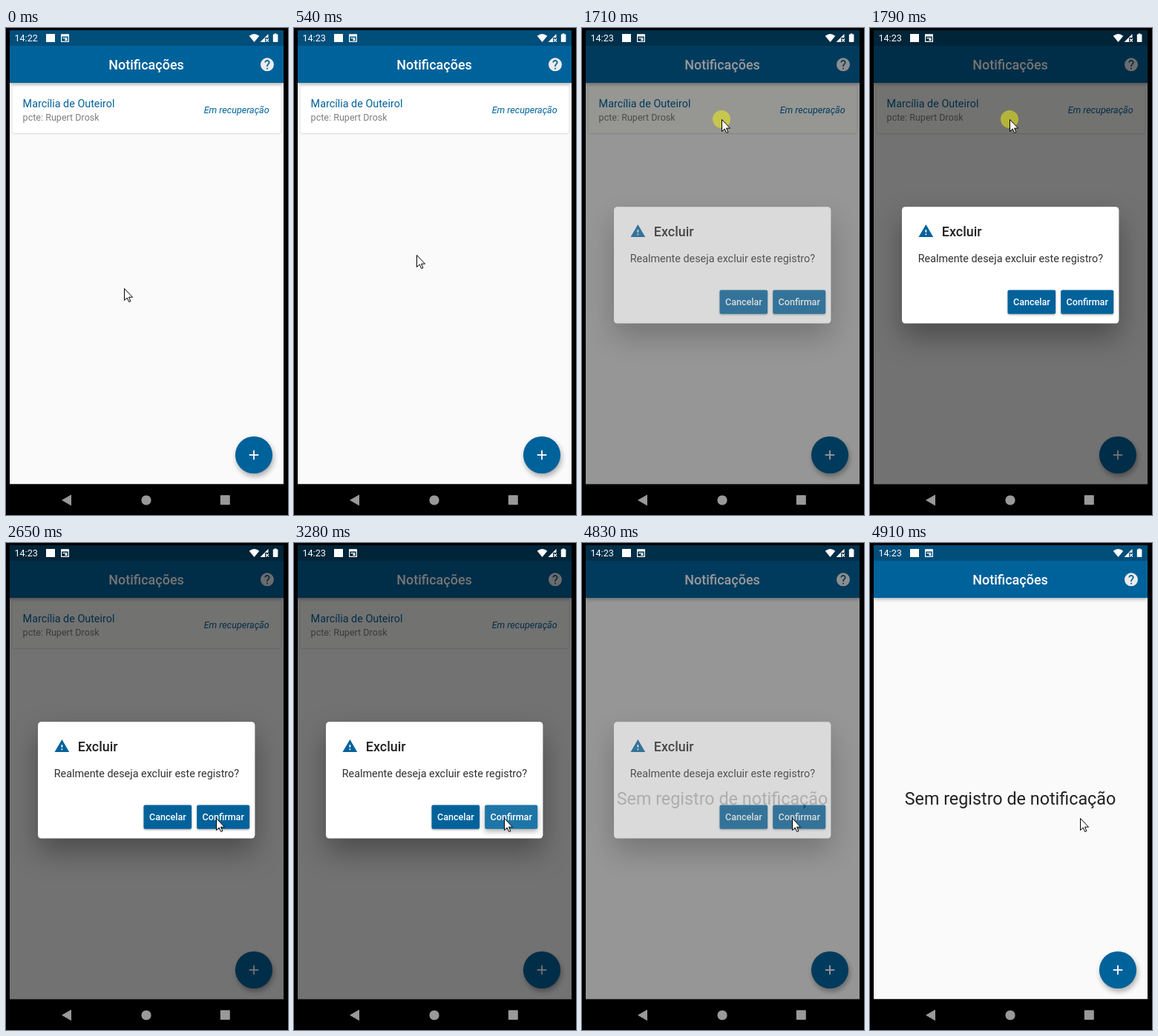
Recreate the animation shown at these times as an HTML page with a canvas. Size 380 by 657 pixels, loop 6.03 s.

```html
<!DOCTYPE html>
<html lang="pt">
<head>
<meta charset="utf-8">
<title>Notificações</title>
<style>
  html, body { margin: 0; width: 100%; height: 100%; overflow: hidden; background: #000; }
  canvas { display: block; width: 380px; height: 657px; }
</style>
</head>
<body>
<canvas id="stage" width="380" height="657"></canvas>
<script>
const LOOP = 6030, DP = 0.898;
const BLUE = '#00629b', INK = '#212121', BODY = '#fafafa';
const SCREEN = [5, 3, 369, 612.5];
const stage = document.getElementById('stage').getContext('2d');
const dialogLayer = document.createElement('canvas');
dialogLayer.width = 380;
dialogLayer.height = 657;
const layer = dialogLayer.getContext('2d');

const HELP = new Path2D('M12 2a10 10 0 1 0 0 20a10 10 0 1 0 0-20zm1 17h-2v-2h2v2zm2.07-7.75l-.9.92C13.45 12.9 13 13.5 13 15h-2v-.5c0-1.1.45-2.1 1.17-2.83l1.24-1.26c.37-.36.59-.86.59-1.41 0-1.1-.9-2-2-2s-2 .9-2 2H8c0-2.21 1.79-4 4-4s4 1.79 4 4c0 .88-.36 1.68-.93 2.25z');
const WARNING = new Path2D('M1 21h22L12 2zm12-3h-2v-2h2v2zm0-4h-2v-4h2v4z');
const ARROW = new Path2D('M.5.5V16.5L4.2 13L6.7 18.5L8.9 17.6L6.5 12.2H11.5z');

// Stepped progress: the first step shows at start, the last one at end.
function steps(t, start, end, count) {
  if (t < start) return 0;
  if (t >= end) return 1;
  return (Math.floor((t - start) / (end - start) * (count - 1) + 0.001) + 1) / count;
}
const smooth = p => p * p * (3 - 2 * p);
const mix = (a, b, p) => a + (b - a) * p;

function text(c, str, x, y, sp, color, style = '400', align = 'left') {
  c.font = `${style} ${sp * DP}px Roboto, sans-serif`;
  c.textAlign = align;
  c.fillStyle = color;
  c.fillText(str, x, y);
}

function rect(c, x, y, w, h, color) {
  c.fillStyle = color;
  c.fillRect(x, y, w, h);
}

function disc(c, x, y, r, color) {
  c.fillStyle = color;
  c.beginPath();
  c.arc(x, y, r, 0, 2 * Math.PI);
  c.fill();
}

function poly(c, points, color) {
  c.fillStyle = color;
  c.beginPath();
  points.forEach(([x, y]) => c.lineTo(x, y));
  c.fill();
}

function icon(c, path, x, y, color) {
  c.save();
  c.translate(x, y);
  c.scale(DP, DP);
  c.fillStyle = color;
  c.fill(path, 'evenodd');
  c.restore();
}

function withShadow(c, alpha, blur, dx, dy, draw) {
  c.save();
  c.shadowColor = `rgba(0,0,0,${alpha})`;
  c.shadowBlur = blur;
  c.shadowOffsetX = dx;
  c.shadowOffsetY = dy;
  draw();
  c.restore();
}

function roundRect(c, x, y, w, h, r, color) {
  c.fillStyle = color;
  c.beginPath();
  c.roundRect(x, y, w, h, r);
  c.fill();
}

function drawCard(c, ripple) {
  const box = [8.6, 77.6, 362, 64.4, 3.6];
  withShadow(c, 0.22, 2, 0, 0.6, () => roundRect(c, ...box, '#fff'));
  if (ripple > 0) {
    c.save();
    c.beginPath();
    c.roundRect(...box);
    c.clip();
    disc(c, 188, 123, mix(20, 200, ripple), 'rgba(150,150,50,0.05)');
    c.restore();
  }
  text(c, 'Marcília de Outeirol', 22.6, 107, 16, BLUE);
  text(c, 'pcte: Rupert Drosk', 22.6, 125, 14, '#7d7d7d');
  text(c, 'Em recuperação', 354.7, 115, 14, BLUE, 'italic 400', 'right');
}

function drawApp(c, t) {
  rect(c, ...SCREEN, BODY);
  if (t < 3520) drawCard(c, steps(t, 1250, 1550, 5));
  if (t >= 4830) text(c, 'Sem registro de notificação', 189, 353, 26, INK, '400', 'center');

  withShadow(c, 0.35, 5, 0, 1.5, () => rect(c, 5, 24, 369, 50, BLUE));
  rect(c, 5, 3, 369, 21, '#004e7a');
  text(c, 'Notificações', 189, 56, 20, '#fff', '500', 'center');
  icon(c, HELP, 341.2, 38.5, '#ececec');

  withShadow(c, 0.32, 7, 1.5, 4, () => disc(c, 334, 576, 25.1, BLUE));
  rect(c, 327.7, 575.1, 12.6, 1.8, '#fff');
  rect(c, 333.1, 569.7, 1.8, 12.6, '#fff');
}

function drawStatus(c, t) {
  text(c, t < 70 ? '14:22' : '14:23', 11.5, 18.3, 14, '#fff');
  rect(c, 54, 8, 12, 11, '#fff');

  c.strokeStyle = '#fff';
  c.lineWidth = 1.2;
  c.strokeRect(74.6, 9.1, 9.8, 9.3);
  rect(c, 74, 8.5, 11, 3, '#fff');
  rect(c, 76.5, 13, 6, 1.2, '#fff');
  rect(c, 79.5, 14.5, 3, 2.5, '#fff');

  c.fillStyle = '#fff';
  c.beginPath();
  c.moveTo(334.5, 19);
  c.lineTo(327.7, 10.7);
  c.quadraticCurveTo(334.5, 5.3, 341.3, 10.7);
  c.fill();

  poly(c, [[342.5, 19], [353.5, 8], [353.5, 13], [349, 13], [349, 19]], '#fff');
  c.beginPath();
  c.moveTo(350, 14.5);
  c.lineTo(354, 18.5);
  c.moveTo(354, 14.5);
  c.lineTo(350, 18.5);
  c.stroke();

  rect(c, 361.5, 7.5, 3, 2, '#fff');
  roundRect(c, 359.8, 8.5, 6.6, 10.5, 0.8, '#fff');
}

function drawNavigation(c) {
  const grey = '#999';
  poly(c, [[75, 637], [88, 629.5], [88, 644.5]], grey);
  disc(c, 189, 637, 6.6, grey);
  roundRect(c, 288.8, 630.3, 13, 13, 1, grey);
}

function drawButton(c, label, x, w, press) {
  withShadow(c, 0.32, mix(3, 9, press), 0, mix(1.2, 4, press), () =>
    roundRect(c, x, 353.5, w, 32.2, 2, BLUE));
  if (press > 0) roundRect(c, x, 353.5, w, 32.2, 2, `rgba(255,255,255,${0.15 * press})`);
  text(c, label, x + w / 2, 374.3, 14, '#fff', '500', 'center');
}

function drawDialog(c, press) {
  c.clearRect(0, 0, 380, 657);
  withShadow(c, 0.34, 38, 0, 18, () => roundRect(c, 43, 241.3, 292.4, 157.2, 4.5, '#fff'));
  icon(c, WARNING, 64.6, 263.2, BLUE);
  text(c, 'Excluir', 96.8, 280.5, 20, INK, '500');
  text(c, 'Realmente deseja excluir este registro?', 64.7, 316, 16, '#303030');
  drawButton(c, 'Cancelar', 185.5, 64.6, 0);
  drawButton(c, 'Confirmar', 257.2, 71, press);
}

function dialogOpacity(t) {
  if (t < 1710 || t >= 4910) return [0, 0];
  if (t < 1790) return [0.4, 0.65];
  return t < 4830 ? [0.54, 1] : [0.4, 0.65];
}

function cursorAt(t) {
  const up = smooth(steps(t, 390, 860, 7));
  const down = smooth(steps(t, 1950, 2500, 8));
  const settle = steps(t, 2580, 2650, 2);
  return [
    159 + 29 * up + 94 * down + settle,
    351 - 228 * up + 235 * down + 13 * settle
  ];
}

function drawCursor(c, t) {
  if (t >= 1010 && t < 1950) disc(c, 188, 123, 12, 'rgba(255,255,0,0.47)');
  c.save();
  c.translate(...cursorAt(t).map(Math.round));
  c.fillStyle = '#fff';
  c.strokeStyle = '#000';
  c.lineWidth = 1;
  c.lineJoin = 'round';
  c.fill(ARROW);
  c.stroke(ARROW);
  c.restore();
}

function render(t) {
  rect(stage, 0, 0, 380, 657, '#000');
  stage.save();
  stage.beginPath();
  stage.rect(...SCREEN);
  stage.clip();
  drawApp(stage, t);
  const [scrim, opacity] = dialogOpacity(t);
  if (opacity) {
    rect(stage, ...SCREEN, `rgba(0,0,0,${scrim})`);
    drawDialog(layer, Math.sin(Math.PI * steps(t, 3200, 3680, 7)));
    stage.globalAlpha = opacity;
    stage.drawImage(dialogLayer, 0, 0);
  }
  stage.restore();
  drawStatus(stage, t);
  drawNavigation(stage);
  drawCursor(stage, t);
}

const start = performance.now();
function tick() {
  render((performance.now() - start) % LOOP);
  requestAnimationFrame(tick);
}
tick();
</script>
</body>
</html>
```
